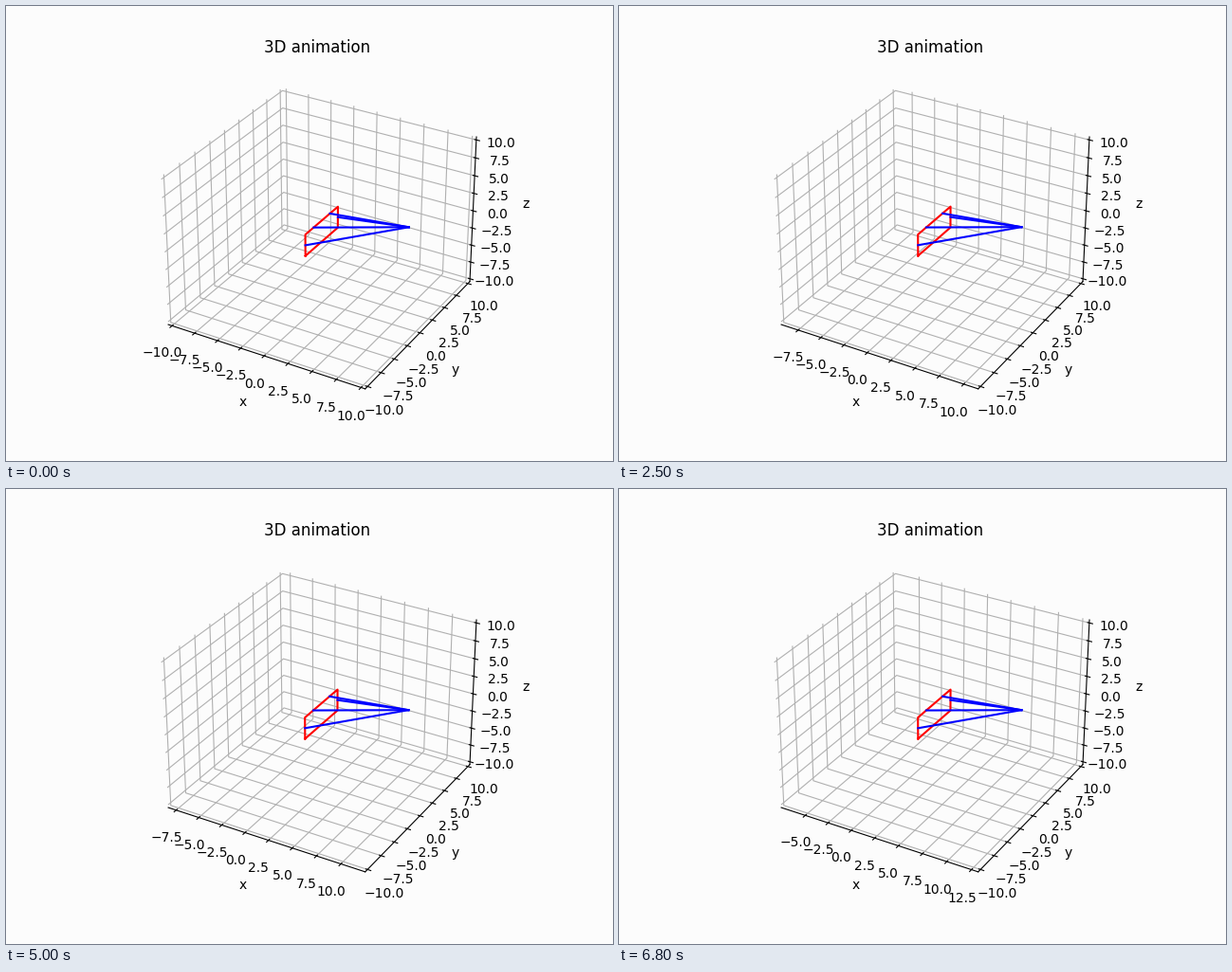
Write a matplotlib script that moves like this. It is 640 px wide and 480 px high and loops after 6.9 s.

```python
import matplotlib.pyplot as plt
import numpy as np
from matplotlib.animation import FuncAnimation
from matplotlib.ticker import FixedLocator

FRAMES = 69
INTERVAL = 100          # ms
STEP = 0.04             # forward travel per frame
REACH = 10              # half width of the view
MARGIN = 1 / 48         # room between the limits and the box edges
TICK = 2.5
PAPER = "#fcfcfc"

# Points are relative to the moving body.
PLATE = np.array([(0, -3, -1.5), (0, 3, -1.5), (0, 3, 1.5),
                  (0, -3, 1.5), (0, -3, -1.5)])
ANCHORS = np.array([(0, 1.5, 1.5), (0, 3, 0), (0, -1.5, 1.5), (0, -3, 0)])
APEX = np.array((9, 0, 4))

fig = plt.figure(figsize=(6.4, 4.8), dpi=100, facecolor=PAPER)
ax = fig.add_subplot(111, projection="3d", facecolor=PAPER)
ax.set_title("3D animation")
ax.set(xlabel="x", ylabel="y", zlabel="z")

for axis in (ax.xaxis, ax.yaxis, ax.zaxis):
    axis.set_pane_color((1, 1, 1, 0))
ax.yaxis.pane.set_edgecolor("#ececec")

shapes = [PLATE] + [np.array([a, APEX]) for a in ANCHORS]
lines = [ax.plot(*s.T, color="b" if i else "r")[0]
         for i, s in enumerate(shapes)]

ax.set_ylim(-REACH, REACH, view_margin=MARGIN)
ax.set_zlim(-REACH, REACH, view_margin=MARGIN)
fixed = np.arange(-REACH, REACH + TICK / 2, TICK)
ax.yaxis.set_major_locator(FixedLocator(fixed))
ax.zaxis.set_major_locator(FixedLocator(fixed))


def follow(center):
    """Move the x range, with ticks only inside the true limits."""
    lo, hi = center - REACH, center + REACH
    ax.set_xlim(lo, hi, view_margin=MARGIN)
    first, last = np.ceil(lo / TICK), np.floor(hi / TICK)
    ax.xaxis.set_major_locator(FixedLocator(np.arange(first, last + 1) * TICK))


def update(n):
    # The view runs one step ahead of the body once it has started.
    follow(STEP * (n + 1) if n else 0)
    pos = np.array((STEP * n, 0, 0))
    for line, shape in zip(lines, shapes):
        line.set_data_3d(*(shape + pos).T)
    return lines


anim = FuncAnimation(fig, update, frames=FRAMES, interval=INTERVAL,
                     init_func=lambda: update(0), repeat=True,
                     repeat_delay=0, blit=False)
plt.show()
```
